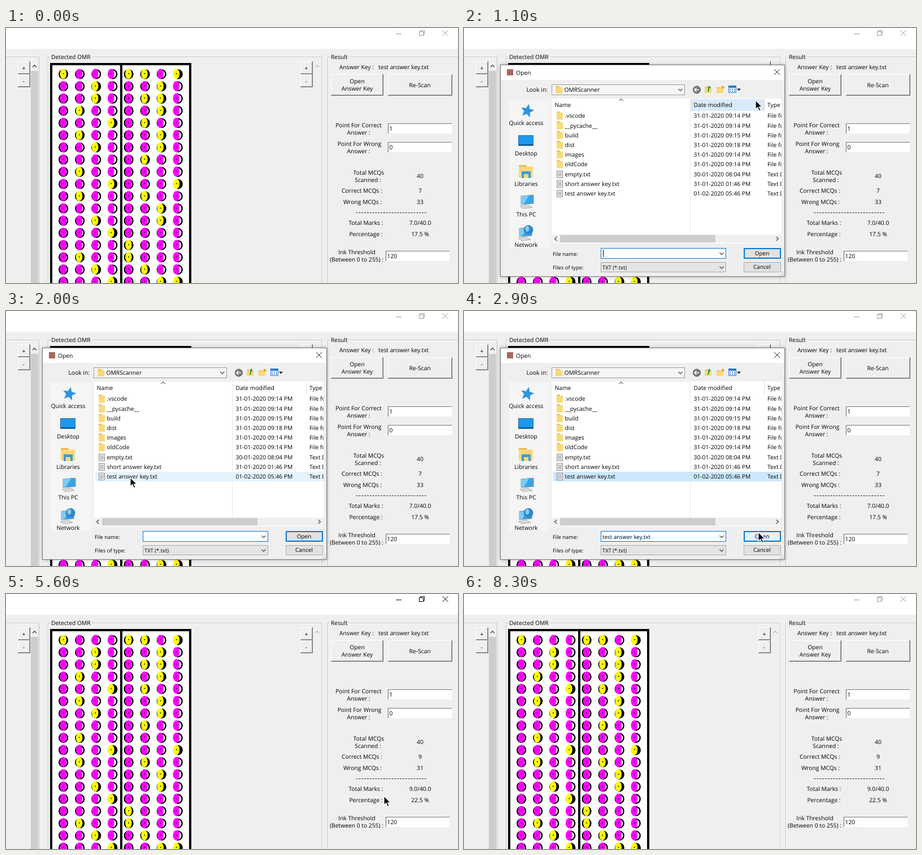
An HTML page with a canvas that plays this animation: 800 by 452 pixels, repeating every 8.4 s.

```html
<!DOCTYPE html>
<html lang="en">
<head>
<meta charset="utf-8">
<title>OMR scanner</title>
<style>
html, body { margin: 0; width: 100%; height: 100%; overflow: hidden; }
canvas { display: block; }
</style>
</head>
<body>
<canvas id="stage" width="800" height="452"></canvas>
<script>
const ctx = document.getElementById('stage').getContext('2d');
const LOOP = 8400, STEP = 100;
const FACE = '#f0eff0';
const MARKED = '0457 26 256 16 35 16 26 5 1 37 15 6 26 3 4 14 25 367'.split(' ');
const FILES = [
  ['.vscode', '31-01-2020 09:14 PM'], ['__pycache__', '31-01-2020 09:14 PM'],
  ['build', '31-01-2020 09:15 PM'], ['dist', '31-01-2020 09:18 PM'],
  ['images', '31-01-2020 09:14 PM'], ['oldCode', '31-01-2020 09:14 PM'],
  ['empty.txt', '30-01-2020 08:04 PM'], ['short answer key.txt', '31-01-2020 01:46 PM'],
  ['test answer key.txt', '01-02-2020 05:46 PM']
];
// Pointer path: time, x, y
const PATH = [
  [0, 640, 470], [600, 622, 108], [900, 604, 104], [1100, 516, 128],
  [1800, 228, 273], [2000, 220, 295], [2300, 224, 296], [2600, 569, 405], [2800, 521, 392],
  [3600, 521, 392], [3800, 667, 205], [4100, 742, 67], [4400, 735, 96], [4600, 735, 98],
  [5100, 468, 270], [5400, 610, 345], [5600, 669, 358], [6100, 784, 290], [6300, 772, 255],
  [6500, 736, 233], [7200, 736, 240], [7700, 715, 460], [LOOP, 715, 470]
];

function pointerAt(t) {
  const i = PATH.findIndex(p => p[0] > t);
  const [t0, x0, y0] = PATH[i - 1], [t1, x1, y1] = PATH[i];
  const u = (t - t0) / (t1 - t0);
  return [x0 + (x1 - x0) * u, y0 + (y1 - y0) * u];
}

function rect(x, y, w, h, fill, stroke, line = 1) {
  ctx.fillStyle = fill;
  ctx.fillRect(x, y, w, h);
  if (!stroke) return;
  ctx.strokeStyle = stroke;
  ctx.lineWidth = line;
  ctx.strokeRect(x + line / 2, y + line / 2, w - line, h - line);
}

function poly(points, stroke, line = 1, fill) {
  ctx.beginPath();
  for (let i = 0; i < points.length; i += 2) ctx.lineTo(points[i], points[i + 1]);
  if (fill) { ctx.closePath(); ctx.fillStyle = fill; ctx.fill(); }
  if (stroke) { ctx.strokeStyle = stroke; ctx.lineWidth = line; ctx.stroke(); }
}

function ellipse(x, y, rx, ry, fill, stroke, line) {
  ctx.beginPath();
  ctx.ellipse(x, y, rx, ry, 0, 0, 7);
  if (fill) { ctx.fillStyle = fill; ctx.fill(); }
  if (stroke) { ctx.strokeStyle = stroke; ctx.lineWidth = line; ctx.stroke(); }
}

// y is the middle of the line
function text(s, x, y, align = 'left', size = 10.3) {
  ctx.font = size + 'px "Open Sans", sans-serif';
  ctx.textAlign = align;
  ctx.fillStyle = '#000';
  ctx.fillText(s, x, y + 3.6);
}
const centred = (s, x, y, size) => text(s, x, y, 'center', size);

function chevron(x, y, dir, color = '#555', r = 3.5) {
  poly([x - r, y - dir * r / 2, x, y + dir * r / 2, x + r, y - dir * r / 2], color, 1.3);
}

function sideChevron(x, y, dir) {
  poly([x - dir * 2, y - 3.5, x + dir * 2, y, x - dir * 2, y + 3.5], '#555', 1.4);
}

function raised(x, y, w, h, pressed) {
  const light = pressed ? '#696969' : '#fff', dark = pressed ? '#fff' : '#696969';
  rect(x, y, w, h, FACE);
  poly([x + .5, y + h, x + .5, y + .5, x + w, y + .5], light);
  poly([x + 1, y + h - 1.5, x + w - 1.5, y + h - 1.5, x + w - 1.5, y + 1], pressed ? FACE : '#a8a8a8');
  poly([x, y + h - .5, x + w - .5, y + h - .5, x + w - .5, y], dark);
}

function field(x, y, w, value) {
  rect(x, y, w, 18, '#fff');
  poly([x + .5, y + 18, x + .5, y + .5, x + w, y + .5], '#777', 1.2);
  text(value, x + 2.5, y + 9.5);
}

function group(x, right, label, labelEnd) {
  for (const [d, c] of [[1, '#fff'], [0, '#c4c4c4']]) {
    poly([labelEnd, 51.5 + d, right + d, 51.5 + d, right + d, 460], c);
    poly([x + 5, 51.5 + d, x + d, 51.5 + d, x + d, 460], c);
  }
  text(label, x + 5.5, 51.5);
}

function zoomButtons(x) {
  raised(x, 59, 22, 23);
  raised(x, 82, 22, 23);
  centred('+', x + 10.5, 71);
  centred('-', x + 10.5, 94);
}

function titleButtons(color) {
  poly([690, 10.5, 700, 10.5], color);
  ctx.strokeStyle = color;
  ctx.strokeRect(731.5, 6.5, 7, 7);
  poly([733.5, 6, 733.5, 4.5, 740.5, 4.5, 740.5, 11.5, 739, 11.5], color);
  closeMark(777.5, 9, color);
}

function closeMark(x, y, color) {
  poly([x - 5, y - 5, x + 5, y + 5], color);
  poly([x - 5, y + 5, x + 5, y - 5], color);
}

function sheet() {
  rect(78, 62, 250, 400, '#000');
  rect(82, 66, 120, 400, '#fff');
  rect(206, 66, 118, 400, '#fff');
  MARKED.forEach((marks, row) => {
    const y = 81.3 + row * 21.65;
    for (let col = 0; col < 8; col++) {
      const k = col % 4, x = (col < 4 ? 101.3 : 216.8) + k * 28.2;
      const marked = marks.includes(col);
      ellipse(x + .3 + k * .85, y + .5, 7.4, 7.7, marked ? '#000' : '#fff', '#000', 2.4);
      ellipse(x, y, 5.8, 9, marked ? '#ffff00' : '#ff00ff');
      ellipse(x + .3, y - .3, 1, 1, '#000');
    }
  });
}

function results(t) {
  const right = t < 4700 ? 7 : 9;
  group(569.5, 805, 'Result', 606);
  text('Answer Key :', 590, 69);
  text('test answer key.txt', 659, 69);
  raised(575, 82, 93, 38, t >= 700 && t < 800);
  centred('Open', 621.5, 94);
  centred('Answer Key', 621.5, 107.5);
  raised(676, 82, 114, 38, t >= 4500 && t < 4700);
  centred('Re-Scan', 732.5, 101.5);
  centred('Point For Correct', 624, 172);
  centred('Answer :', 624, 185.5);
  field(676, 169, 113, '1');
  centred('Point For Wrong', 625.5, 205);
  centred('Answer :', 624, 218);
  field(676, 202, 113, '0');
  centred('Total MCQs', 642, 256);
  centred('Scanned :', 640.5, 269.5);
  centred('40', 733, 262.5);
  centred('Correct MCQs :', 630, 288.5);
  centred(right, 733, 288.5);
  centred('Wrong MCQs :', 631, 308);
  centred(40 - right, 733, 308);
  ctx.setLineDash([3, 1.85]);
  poly([619.5, 327.5, 745, 327.5], '#222');
  ctx.setLineDash([]);
  centred('Total Marks :', 637, 345.5);
  centred(right + '.0/40.0', 733, 345.5);
  centred('Percentage :', 637, 365);
  centred((right * 2.5).toFixed(1) + ' %', 733, 365);
  centred('Ink Threshold', 621, 397.5);
  centred('(Between 0 to 255) :', 620.5, 410.5);
  field(672, 395, 113, '120');
}

function folder(x, y, w = 12, h = 13) {
  rect(x, y, w * .55, h, '#e8b84c');
  rect(x, y + h * .12, w, h * .88, '#f9d978');
}

function page(x, y) {
  rect(x, y, 11, 13, '#f4f4f4', '#888');
  for (let i = 3; i < 11; i += 2) rect(x + 2, y + i, 7, 1, '#999');
}

function globe(x, y, r) {
  ellipse(x, y, r, r, '#2f86cc');
  ellipse(x - 2, y - 2, r * .4, r * .6, '#8fcbe8');
}

function monitor(x, y) {
  poly([x, y + 2, x + 22, y, x + 22, y + 15, x, y + 17], '#7c8b96', 1, '#39a5e6');
  poly([x, y + 2, x + 14, y + 1, x + 5, y + 16, x, y + 17], null, 1, '#7dcbf5');
  poly([x - 2, y + 20, x + 13, y + 18, x + 20, y + 22, x + 4, y + 24], '#aaa', 1, '#ddd');
}

function places() {
  rect(79, 126, 73, 264, '#f5f5f6');
  const star = [];
  for (let i = 0; i < 10; i++) {
    const a = i * Math.PI / 5 - 1.35, r = i % 2 ? 5.5 : 12.5;
    star.push(112 + r * Math.cos(a), 147 + r * Math.sin(a));
  }
  poly(star, null, 1, '#2c93e0');
  rect(96, 190, 27, 19, '#1e98ec', '#2f6c9c');
  rect(97, 206, 25, 2, '#0a5c9c');
  folder(97, 243, 25, 22);
  rect(102, 254, 16, 12, '#3f9bdc');
  rect(106, 259, 8, 7, '#f9d978');
  monitor(101, 296);
  monitor(98, 353);
  globe(114, 358, 8.5);
  ['Quick access', 'Desktop', 'Libraries', 'This PC', 'Network']
    .forEach((s, i) => centred(s, 110, 168 + i * 54.2));
}

function toolbar() {
  text('Look in:', 148, 109, 'right');
  rect(155, 100, 236, 19, '#f6f6f6', '#999');
  folder(162, 103);
  text('OMRScanner', 177.5, 109);
  chevron(383, 109.5, 1);
  ellipse(412, 109.5, 6.5, 6.5, '#777', '#555', 1);
  poly([416, 109.5, 408.5, 109.5], '#fff', 1.6);
  poly([411.5, 106, 408, 109.5, 411.5, 113], '#fff', 1.6);
  folder(426, 104, 12, 11);
  poly([432, 113, 434, 104], '#2b9a3a', 2);
  poly([431, 106, 434.5, 102, 437, 107], null, 1, '#2b9a3a');
  folder(447, 105, 12, 10);
  ellipse(458, 105, 2.5, 2.5, '#f6a623');
  rect(468, 102, 14, 13, '#fff', '#2878c8');
  rect(468, 102, 14, 4, '#2878c8');
  for (let i = 0; i < 6; i++) rect(470 + i % 3 * 4, 107.5 + (i > 2) * 3.5, 2, 2, '#2878c8');
  poly([483, 107.5, 490, 107.5, 486.5, 111.5], null, 1, '#222');
}

function fileList(px, py, chosen) {
  rect(155, 125, 407, 257, '#fff');
  const overHeader = px > 400 && px < 531 && py > 125 && py < 147;
  if (overHeader) {
    rect(401, 126, 130, 21, '#d9ebf9');
    chevron(521, 137, 1);
  }
  rect(400, 126, 1, 240, '#e8e8e8');
  rect(531, 126, 1, 21, '#ddd');
  chevron(278, 127.5, -1, '#777');
  text('Name', 160.5, 136);
  text('Date modified', 406.5, 136);
  ctx.save();
  ctx.beginPath();
  ctx.rect(155, 125, 407, 257);
  ctx.clip();
  text('Type', 537, 136);
  FILES.forEach(([name, date], i) => {
    const y = 155.8 + i * 17.2, isFolder = i < 6;
    const hover = px > 158 && px < 562 && Math.abs(py - y) < 8.6;
    const selected = chosen && i === 8;
    if (selected || hover) rect(158, Math.round(y - 8.5), 404, 17, selected ? '#cce8ff' : '#e5f3ff');
    if (isFolder) folder(164, y - 7.5, 11, 14);
    else page(164, Math.round(y - 6.5));
    text(name, 178.5, y);
    text(date, 406.5, y);
    text(isFolder ? 'File folder' : 'Text Document', 537, y);
  });
  ctx.restore();
  rect(156, 366, 406, 15, '#f0f0f0');
  rect(170, 367, 275, 13, '#cdcdcd');
  sideChevron(162.5, 373.5, -1);
  sideChevron(554.5, 373.5, 1);
}

function dialog(t, px, py) {
  const chosen = t >= 2300;
  ctx.shadowColor = 'rgba(0,0,0,.3)';
  ctx.shadowBlur = 6;
  rect(64, 65, 504, 376, FACE);
  ctx.shadowBlur = 0;
  ctx.shadowColor = 'transparent';
  rect(64, 65, 504, 376, FACE, '#777');
  rect(65, 66, 502, 26, '#fff');
  rect(76, 73, 11, 11, '#a8655c');
  text('Open', 92, 79);
  closeMark(554, 78, '#222');
  toolbar();
  places();
  fileList(px, py, chosen);

  text('File name:', 157, 400, 'left', 9.4);
  rect(242, 390, 222, 19, '#fff', '#0078d7');
  if (chosen) text('test answer key.txt', 245, 400, 'left', 9.8);
  else if ((t - 1000) % 1060 < 530) rect(246, 393, 1, 13, '#000');
  chevron(456, 400, 1);
  text('Files of type:', 157, 424, 'left', 9.4);
  rect(242, 415, 222, 18, '#e4e4e4', '#aaa');
  text('TXT (*.txt)', 245, 424.5, 'left', 9.4);
  chevron(456, 424.5, 1);
  const overOpen = px > 495 && px < 560 && py > 390 && py < 409;
  rect(495, 390, 66, 19, overOpen ? '#e5f1fb' : '#e1e1e1', '#0078d7', 2);
  centred('Open', 527.5, 399.5, 10);
  rect(495, 415, 66, 18, '#e1e1e1', '#adadad');
  centred('Cancel', 527.5, 423.5, 10);
  for (const [x, y] of [[564, 432], [561, 435], [564, 435], [558, 438], [561, 438], [564, 438]])
    rect(x, y, 1.5, 1.5, '#bbb');
}

// The window system fades and zooms the dialog for one step at either end
function dialogWindow(t, px, py) {
  const fading = t < 1000 || t >= 3000;
  ctx.save();
  if (fading) {
    ctx.globalAlpha = .4;
    ctx.translate(316, 253);
    ctx.scale(.9, .9);
    ctx.translate(-316, -253);
  }
  dialog(t, px, py);
  ctx.restore();
}

function pointer(x, y) {
  ctx.save();
  ctx.translate(x, y);
  poly([0, 0, 0, 16, 3.7, 12.6, 6.4, 18.7, 9, 17.6, 6.4, 11.7, 11.3, 11.5, 0, 0], '#fff', 1.2, '#000');
  ctx.restore();
}

function draw(t) {
  const [px, py] = pointerAt(t);
  const active = (t >= 700 && t < 900) || (t >= 3000 && t < 8300);
  rect(0, 0, 800, 452, FACE);
  rect(0, 0, 800, 37, '#fff');
  titleButtons(active ? '#000' : '#999');

  poly([0, 51.5, 58.5, 51.5, 58.5, 460], '#c4c4c4');
  poly([0, 52.5, 57.5, 52.5], '#fff');
  zoomButtons(21);
  rect(44, 59, 13, 400, '#f0f0f0');
  rect(44, 76, 13, 400, '#cdcdcd');
  chevron(50.5, 67.5, -1, '#444');

  group(74.5, 559.5, 'Detected OMR', 152);
  zoomButtons(521);
  chevron(550.5, 67.5, -1, '#bbb');
  sheet();
  results(t);
  if (t >= 900 && t < 3100) dialogWindow(t, px, py);
  pointer(px, py);
}

ctx.textRendering = 'geometricPrecision';
function tick() {
  draw(Math.floor(performance.now() % LOOP / STEP) * STEP);
  requestAnimationFrame(tick);
}
tick();
</script>
</body>
</html>
```
